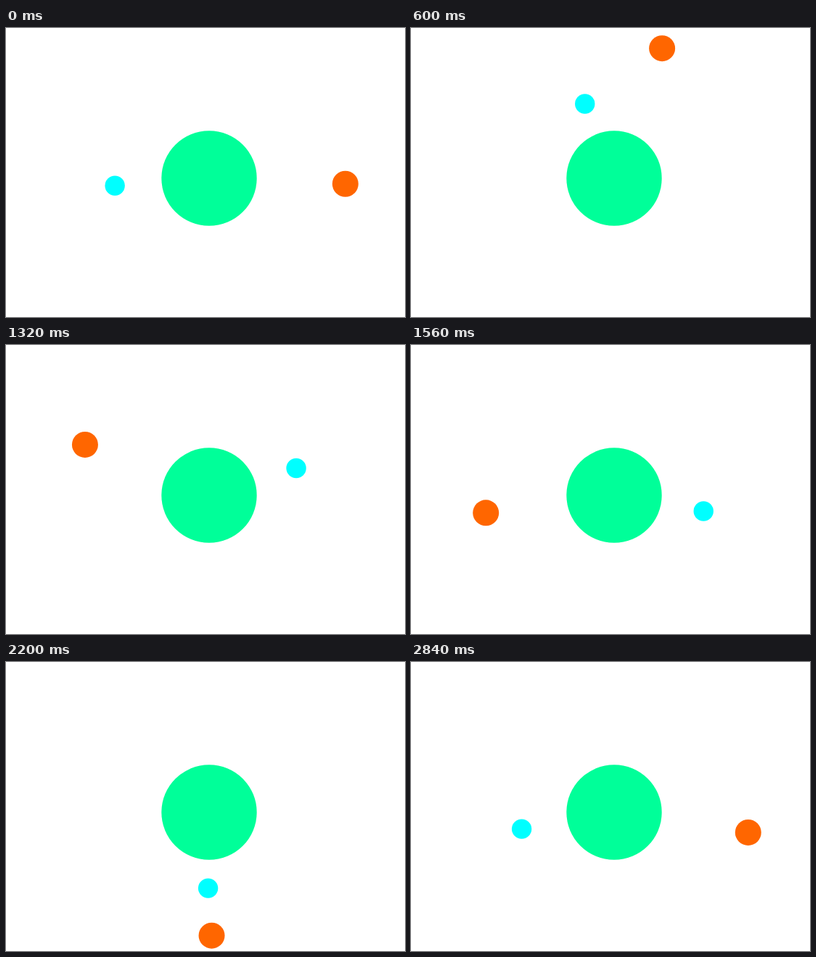
An HTML page that plays this animation: 550x400 px, repeating every 2880 ms.

```html
<!DOCTYPE html>
<html lang="en">
<head>
<meta charset="utf-8">
<title>Orbits</title>
<style>
  html, body { margin: 0; width: 100%; height: 100%; overflow: hidden; background: #fff; }
  svg { display: block; width: 100%; height: 100%; }
</style>
</head>
<body>
<svg viewBox="0 0 550 400">
  <circle cx="280" cy="208" r="65.7" fill="#00ff99"/>
  <circle id="cyan" r="13.7" fill="#00ffff"/>
  <circle id="orange" r="18" fill="#ff6600"/>
</svg>
<script>
const STEP = 40, STEPS = 72;
const RAD = Math.PI / 180;
// Just under a full turn per loop, which leaves a small jump at the seam.
const DEGREES_PER_STEP = 4.98;

// Tilted ellipses; sway is a slight lead in degrees that is largest at step peak.
const orbits = [
  { id: 'orange', cx: 283.9, cy: 197.7, a: 184.9, b: 180.6, tilt: -16.4,
    side: 1, offset: -4.3, sway: 1.2, peak: 38 },
  { id: 'cyan', cx: 278.2, cy: 206.4, a: 128.7, b: 106.7, tilt: -2.4,
    side: -1, offset: -3.85, sway: 1.75, peak: 34 }
];

function place(orbit, step) {
  const { id, cx, cy, a, b, side, offset, sway, peak } = orbit;
  const tilt = orbit.tilt * RAD;
  const lead = sway * Math.cos(2 * Math.PI * (step - peak) / STEPS);
  const turn = (DEGREES_PER_STEP * step + offset + lead) * RAD - tilt;
  // Keeps the speed along the ellipse nearly even.
  const angle = turn + (a - b) / (2 * (a + b)) * Math.sin(2 * turn);
  const u = a * Math.cos(angle), v = b * Math.sin(angle);
  const x = u * Math.cos(tilt) - v * Math.sin(tilt);
  const y = u * Math.sin(tilt) + v * Math.cos(tilt);
  const dot = document.getElementById(id);
  dot.setAttribute('cx', (cx + side * x).toFixed(2));
  dot.setAttribute('cy', (cy - y).toFixed(2));
}

const start = performance.now();

function draw() {
  const elapsed = Math.max(0, performance.now() - start);
  const step = Math.floor(elapsed / STEP) % STEPS;
  orbits.forEach(orbit => place(orbit, step));
  requestAnimationFrame(draw);
}
draw();
</script>
</body>
</html>
```
